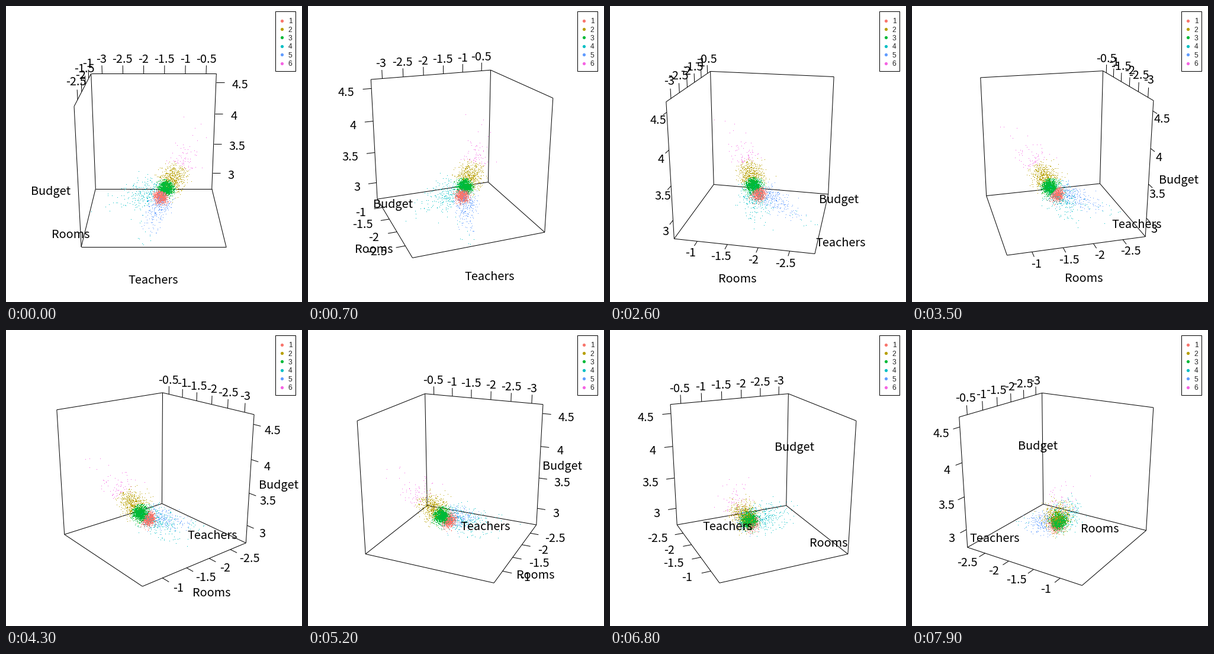
A matplotlib script for the animation above (8000 ms loop, 500x500 px).

```python
import numpy as np
import matplotlib
matplotlib.rcParams["toolbar"] = "None"
import matplotlib.pyplot as plt
from matplotlib.animation import FuncAnimation
from matplotlib.collections import LineCollection
from matplotlib.patches import Rectangle

SIZE, DPI = 500, 100
FRAMES, INTERVAL, STEP = 80, 100, 3      # degrees turned per frame
PX = 72 / DPI                            # points per pixel

FOCAL, DIST, TILT = 933, 4.11, np.radians(20)
TICK, TITLE = 1 / 15, 0.65
BASELINE = 10                            # text baseline below its anchor
FONT = ["Noto Sans CJK JP", "Liberation Sans"]
COLORS = ["#F8766D", "#B79F00", "#00BA38", "#00BFC4", "#619CFF", "#F564E3"]

# tick values and their places inside the unit cube
teacher_vals = np.arange(-3, -0.4, 0.5)
room_vals = np.arange(-2.5, -0.9, 0.5)
budget_vals = np.arange(3, 4.6, 0.5)
teacher_pos = (teacher_vals + 1.76) * 0.332
room_pos = (room_vals + 1.75) * 0.438
budget_pos = (budget_vals - 3.677) * 0.522

# each title sits off the middle of one lower or left edge
title_pos = -TITLE * (1 - np.eye(3))


def project(p, angle):
    """Turn points about the vertical axis; return stage pixels and depth."""
    x, y, z = np.moveaxis(np.asarray(p, float), -1, 0)
    c, s = np.cos(angle), np.sin(angle)
    x, y = x * c - y * s, x * s + y * c
    depth = DIST - z * np.sin(TILT) + y * np.cos(TILT)
    up = z * np.cos(TILT) + y * np.sin(TILT)
    k = FOCAL / depth
    return np.stack([SIZE / 2 - 0.5 + x * k, SIZE / 2 - up * k], -1), depth


def make_cloud():
    """Blobs that trail away from the third one, grouped by likelihood."""
    rng = np.random.default_rng(12)
    count = np.array([900, 600, 1300, 300, 330, 80])
    spread = np.array([.027, .053, .030, .065, .048, .075])
    centers = np.array([(.055, .002, -.355), (.145, .083, -.240),
                        (.096, .054, -.302), (-.045, .013, -.330),
                        (.045, -.095, -.365), (.195, .135, -.150)])
    kind = np.repeat(np.arange(6), count)
    middle = centers[2]
    trail = rng.gamma(2.5, 1 / 2.5, (len(kind), 1))
    trail[kind == 0] = 1
    pts = (middle + (centers - middle)[kind] * trail
           + rng.normal(size=(len(kind), 3)) * 0.85 * spread[kind, None])
    gap = np.linalg.norm(pts[:, None] - centers, axis=2)
    cost = (gap / spread) ** 2 / 2 + 3 * np.log(spread) - np.log(count)
    return np.clip(pts, -.5, .5), cost.argmin(axis=1)


def far_sides(angle):
    """Signs of the two walls that face away from the viewer."""
    a = angle - 1e-4
    return (1 if np.sin(a) > 0 else -1), (1 if np.cos(a) > 0 else -1)


def box_edges(sx, sy):
    x, y, h = sx / 2, sy / 2, 0.5
    floor = [(x, y, -h), (-x, y, -h), (-x, -y, -h), (x, -y, -h)]
    edges = [(floor[i], floor[i - 1]) for i in range(4)]
    edges += [((a, b, -h), (a, b, h)) for a, b in ((x, y), (-x, y), (x, -y))]
    edges += [((x, y, h), (-x, y, h)), ((x, y, h), (x, -y, h))]
    return np.array(edges)


def axis_ticks(sx, sy):
    """Position and outward direction for every tick, in label order."""
    x, y = sx / 2, sy / 2
    up, side = (0, 0, 1), (-sx, 0, 0)
    ticks = [((v, y, .5), up) for v in teacher_pos]
    if sx < 0 < sy:
        ticks += [((x, v, .5), up) for v in room_pos]
    else:
        ticks += [((-x, v, -.5), side) for v in room_pos]
    ticks += [((-x, y, v), side) for v in budget_pos]
    return np.array(ticks, float)


fig = plt.figure(figsize=(SIZE / DPI, SIZE / DPI), dpi=DPI, facecolor="white")
ax = fig.add_axes([0, 0, 1, 1])
ax.set(xlim=(0, SIZE), ylim=(SIZE, 0))
ax.axis("off")

cloud, group = make_cloud()
rgba = matplotlib.colors.to_rgba_array(COLORS)[group]

lines = LineCollection([], colors="black", linewidths=PX, zorder=1)
ax.add_collection(lines)
dots = ax.scatter(cloud[:, 0], cloud[:, 1], s=PX ** 2, marker="s",
                  linewidths=0, zorder=2)


def label(text):
    return ax.text(0, 0, text, family=FONT, size=19.9 * PX, color="black",
                   ha="center", va="baseline", zorder=3)


tick_labels = [label(f"{v:g}")
               for v in np.concatenate([teacher_vals, room_vals, budget_vals])]
titles = [label(name) for name in ("Teachers", "Rooms", "Budget")]
renderer = fig.canvas.get_renderer()
widths = np.array([t.get_window_extent(renderer).width for t in tick_labels])

# legend
ax.add_patch(Rectangle((454.5, 8.5), 34, 101, fc="white", ec="black", lw=PX, zorder=4))
for i, color in enumerate(COLORS):
    y = 24.5 + i * 14.4
    ax.plot(465.7, y, "o", ms=5.2 * PX, mew=0, color=color, zorder=5)
    ax.text(480, y + 4.8, str(i + 1), family="Liberation Sans", size=12 * PX,
            color="#222222", ha="center", va="baseline", zorder=5)


def place(texts, anchors, shift):
    for text, (x, y), dx in zip(texts, anchors, shift):
        text.set_position((x + dx - 0.7, y + BASELINE))


def update(frame):
    angle = np.radians(frame * STEP)
    sx, sy = far_sides(angle)

    ticks = axis_ticks(sx, sy)
    pos, out = ticks[:, 0], ticks[:, 1]
    marks = np.stack([pos, pos + out * TICK], axis=1)
    segments = np.concatenate([box_edges(sx, sy), marks])
    lines.set_segments(list(project(segments, angle)[0]))

    # labels lean away from the box as their ticks turn sideways
    lean = out[:, 0] * np.cos(angle)
    shift = 0.48 * lean * np.minimum(1, np.abs(lean) / 0.5) * widths
    place(tick_labels, project(pos + out * 2 * TICK, angle)[0], shift)
    place(titles, project(title_pos, angle)[0], np.zeros(3))

    xy, depth = project(cloud, angle)
    order = np.argsort(-depth)
    dots.set_offsets(np.floor(xy[order]) + 0.5)
    dots.set_facecolors(rgba[order])
    return [lines, dots, *tick_labels, *titles]


anim = FuncAnimation(fig, update, frames=FRAMES, interval=INTERVAL,
                     init_func=lambda: update(0), repeat=True,
                     repeat_delay=0, blit=False)
plt.show()
```
